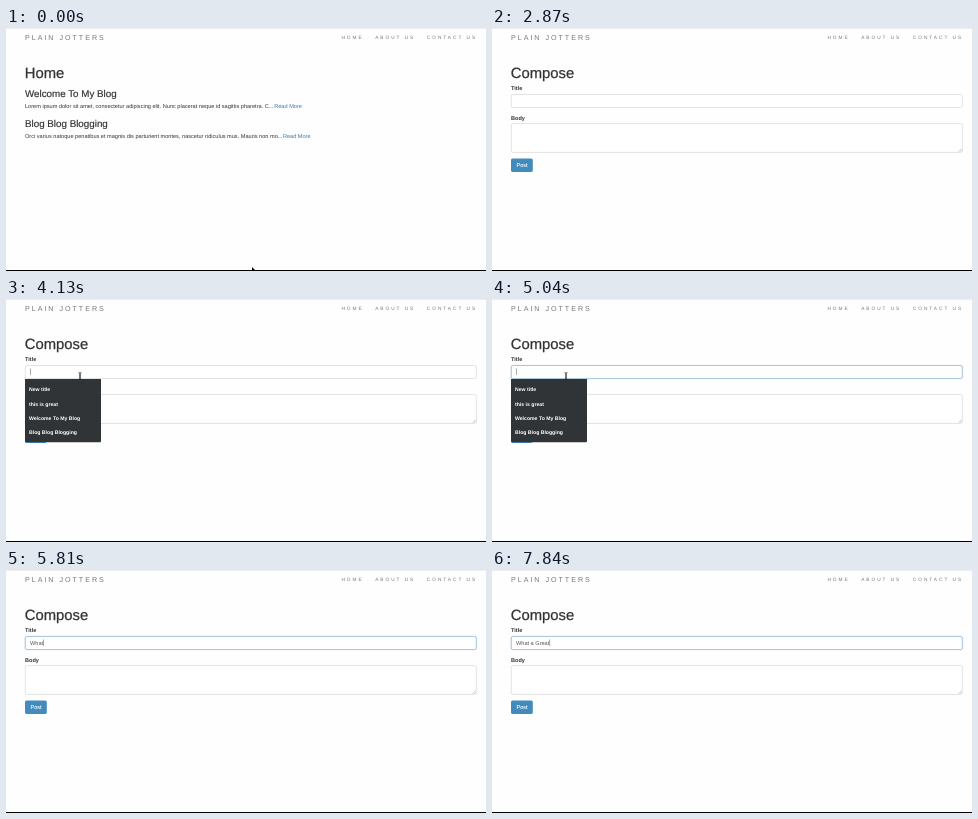
Animation of 480 by 243 pixels, one loop 8 s. Source, as an HTML page with a canvas:

```html
<!DOCTYPE html>
<html lang="en">
<head>
<meta charset="utf-8">
<title>Blog compose</title>
<style>
  html, body { margin: 0; width: 100%; height: 100%; overflow: hidden; background: #fff; }
  canvas { display: block; width: 480px; height: 243px; }
</style>
</head>
<body>
<canvas id="stage"></canvas>
<script>
const W = 480, H = 243, LOOP = 8000, STEP = 70;
const FONT = '"Liberation Sans", Arial, sans-serif';
const canvas = document.getElementById('stage');
const ctx = canvas.getContext('2d');
const dpr = window.devicePixelRatio || 1;
canvas.width = W * dpr;
canvas.height = H * dpr;

const COMPOSE_AT = 2870;

// Pointer positions: [time, x, y]
const homePath = [
  [0, 246, 239], [70, 150, 150], [140, 98, 72], [210, 232, 39], [280, 384, 76],
  [420, 380, 103], [490, 364, 102], [560, 345, 92], [630, 326, 78],
  [700, 310, 62], [770, 297, 46], [840, 287, 30], [910, 281, 17]
];
const composePath = [
  [3430, 171, 10], [3500, 150, 42], [3570, 117, 72], [3640, 90, 88],
  [3710, 75, 90], [3780, 72, 82], [3850, 74, 77]
];

// Typed characters: [time, text so far]
const typing = [
  [5180, 'W'], [5320, 'Wh'], [5530, 'Wha'], [5810, 'What'], [5950, 'What '],
  [6090, 'What a'], [6300, 'What a '], [6720, 'What a G'], [6930, 'What a Gr'],
  [7350, 'What a Gre'], [7630, 'What a Grea'], [7840, 'What a Great']
];

const between = (t, a, b) => t >= a && t < b;
const latest = (keys, t) => keys.filter(k => k[0] <= t).pop();

function text(str, x, y, size, color, { weight = 400, space = 0, heavy = 0, align = 'left' } = {}) {
  ctx.font = `${weight} ${size}px ${FONT}`;
  ctx.textRendering = 'geometricPrecision';
  ctx.letterSpacing = space + 'px';
  ctx.textAlign = align;
  ctx.fillStyle = color;
  ctx.fillText(str, x, y);
  if (heavy) {
    ctx.lineJoin = 'round';
    ctx.strokeStyle = color;
    ctx.lineWidth = heavy;
    ctx.strokeText(str, x, y);
  }
}

function box(x, y, w, h, r, fill, stroke, line = 0.6) {
  ctx.beginPath();
  ctx.roundRect(x, y, w, h, r);
  if (fill) { ctx.fillStyle = fill; ctx.fill(); }
  if (stroke) { ctx.strokeStyle = stroke; ctx.lineWidth = line; ctx.stroke(); }
}

function arrow(x, y) {
  const pts = [[0, 0], [0, 6.4], [1.5, 5.1], [2.5, 7.4], [3.6, 6.9], [2.6, 4.7], [4.6, 4.6]];
  ctx.beginPath();
  pts.forEach(([dx, dy]) => ctx.lineTo(x + dx, y + dy));
  ctx.closePath();
  ctx.lineJoin = 'round';
  ctx.strokeStyle = '#fff';
  ctx.lineWidth = 0.9;
  ctx.stroke();
  ctx.fillStyle = '#000';
  ctx.fill();
}

function iBeam(x, y) {
  ctx.beginPath();
  for (const side of [-1.5, 1.5]) {
    ctx.moveTo(x + side, y - 3.4);
    ctx.quadraticCurveTo(x, y - 3.4, x, y - 2.4);
    ctx.lineTo(x, y + 2.4);
    ctx.quadraticCurveTo(x, y + 3.4, x + side, y + 3.4);
  }
  ctx.strokeStyle = '#222';
  ctx.lineWidth = 0.75;
  ctx.stroke();
}

function chrome() {
  ctx.fillStyle = '#fefefe';
  ctx.fillRect(0, 0, W, H);
  ctx.fillStyle = '#dcdcdc';
  ctx.fillRect(0, 0, W, 0.5);
  const nav = { space: 1.98 };
  text('PLAIN JOTTERS', 19, 11.8, 7.14, '#777', nav);
  text('HOME', 335.4, 11, 4.76, '#777', nav);
  text('ABOUT US', 369.2, 11, 4.76, '#777', nav);
  text('CONTACT US', 420.8, 11, 4.76, '#777', nav);
}

function bottomEdge() {
  ctx.fillStyle = '#000';
  ctx.fillRect(0, 242, W, 1);
}

function heading(str) {
  text(str, 18.8, 50, 14.8, '#333', { heavy: 0.25 });
}

function post(title, y, body, linkX) {
  text(title, 19, y, 9.8, '#333', { heavy: 0.18 });
  text(body, 19, y + 11.2, 5.6, '#333');
  text('Read More', linkX, y + 11.2, 5.6, '#3f78a8');
}

function home(t) {
  heading('Home');
  post('Welcome To My Blog', 69.2,
    'Lorem ipsum dolor sit amet, consectetur adipiscing elit. Nunc placerat neque id sagittis pharetra. C...', 268.2);
  post('Blog Blog Blogging', 99.2,
    'Orci varius natoque penatibus et magnis dis parturient montes, nascetur ridiculus mus. Mauris non mo...', 276.9);
  if (t < 980) {
    const [, x, y] = latest(homePath, t);
    arrow(x, y);
  }
}

function titleField(t) {
  const glow = t < 4270 ? 0 : t < 4340 ? 0.5 : 1;
  if (glow) {
    ctx.save();
    ctx.shadowColor = `rgba(102,175,233,${0.4 * glow})`;
    ctx.shadowBlur = 2 * dpr;
    box(19.3, 66.5, 451, 13, 1.6, '#fff');
    ctx.restore();
  }
  box(19.3, 66.5, 451, 13, 1.6, '#fff', '#d0d0d0');
  if (glow) {
    ctx.globalAlpha = glow;
    box(19.3, 66.5, 451, 13, 1.6, null, '#86b9dc', 0.6);
    ctx.globalAlpha = 1;
  }
  const typed = latest(typing, t);
  const str = typed ? typed[1] : '';
  text(str, 24, 75, 5.6, '#555');
  if (t >= 4060 && !between(t, 4620, 5040)) {
    ctx.fillStyle = '#555';
    ctx.fillRect(24.3 + ctx.measureText(str).width, 69.4, 0.5, 6.6);
  }
}

function suggestions(t) {
  if (!between(t, 4130, 5320)) return;
  const all = ['New title', 'this is great', 'Welcome To My Blog', 'Blog Blog Blogging'];
  const rows = t < 5180 ? all : [all[2]];
  box(19, 80, 76, 6.4 + rows.length * 14.2, [0, 0, 1, 1], '#303437');
  rows.forEach((row, i) => text(row, 23, 92.4 + i * 14.15, 5.15, '#fff', { weight: 700 }));
}

function pointer(t) {
  if (!between(t, 3430, 5180)) return;
  const [, x, y] = latest(composePath, t);
  if (between(t, 3990, 4130)) {
    ctx.beginPath();
    ctx.arc(x, y, 6.4, 0, Math.PI * 2);
    ctx.fillStyle = 'rgba(255,255,255,0.6)';
    ctx.fill();
    ctx.strokeStyle = '#333';
    ctx.lineWidth = 0.9;
    ctx.stroke();
  }
  if (between(y, 66, 80)) iBeam(x, y);
  else arrow(x, y);
}

function compose(t) {
  heading('Compose');
  text('Title', 19, 62.4, 5.55, '#333', { weight: 700 });
  text('Body', 19, 91.5, 5.55, '#333', { weight: 700 });
  titleField(t);

  box(19.3, 95.6, 451, 28.8, 1.6, '#fff', '#d0d0d0');
  ctx.beginPath();
  for (const d of [1.3, 3]) {
    ctx.moveTo(469.6 - d, 123.6);
    ctx.lineTo(469.6, 123.6 - d);
  }
  ctx.strokeStyle = '#888';
  ctx.lineWidth = 0.45;
  ctx.stroke();

  box(19, 130.5, 21.8, 13.4, 1.6, '#428bbc');
  text('Post', 30, 139.2, 5.6, '#fff', { align: 'center', heavy: 0.1 });

  suggestions(t);
  pointer(t);
}

function draw(now) {
  const t = Math.floor((now % LOOP) / STEP) * STEP;
  ctx.setTransform(dpr, 0, 0, dpr, 0, 0);
  chrome();
  if (t < COMPOSE_AT) home(t);
  else compose(t);
  bottomEdge();
}

let start;
function tick(now) {
  start ??= now;
  draw(now - start);
  requestAnimationFrame(tick);
}
draw(0);
requestAnimationFrame(tick);
</script>
</body>
</html>
```
